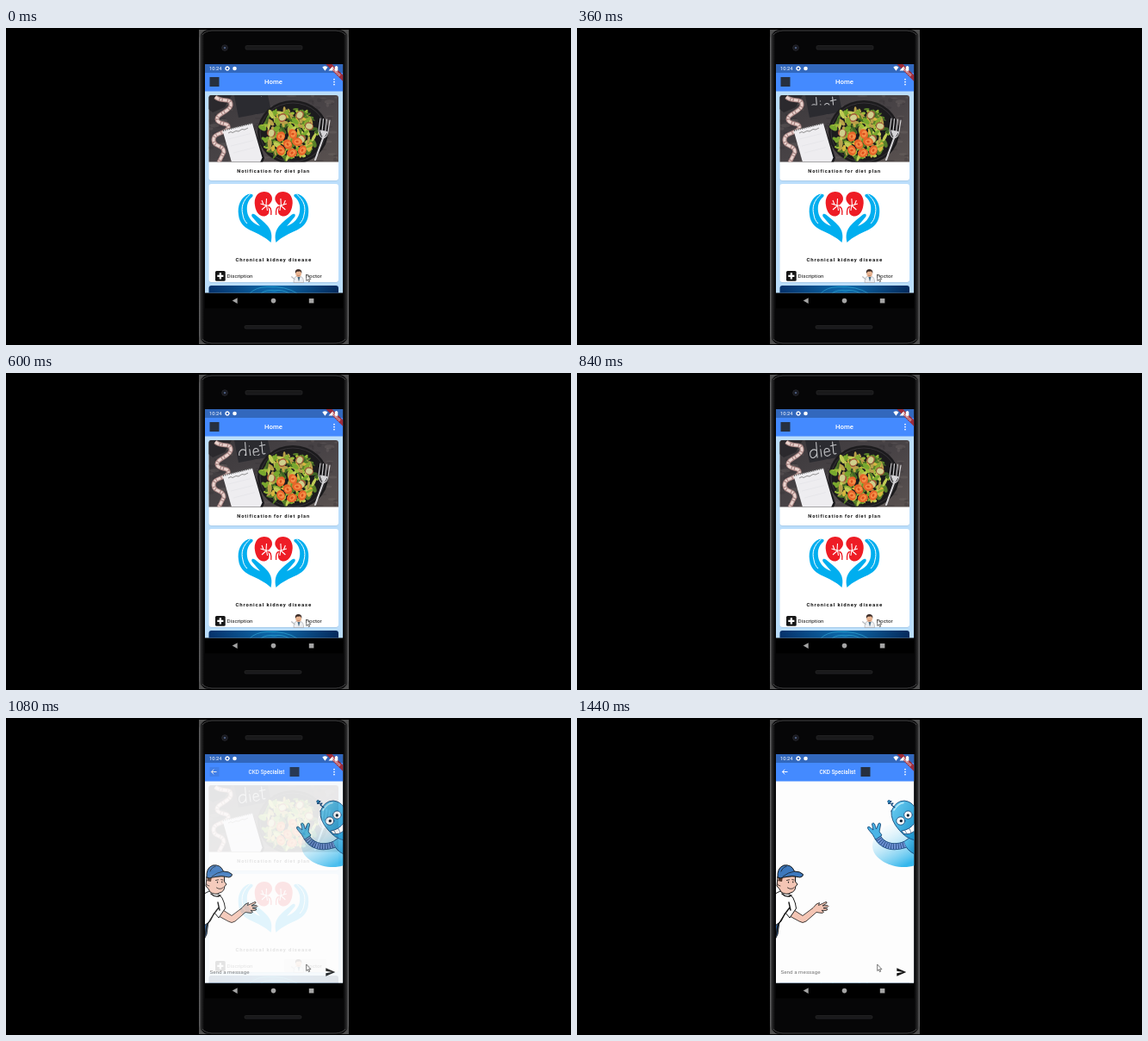
Animation of 656x368 px, one loop 1800 ms. Source, as an HTML page:

```html
<!DOCTYPE html>
<html lang="en">
<head>
<meta charset="utf-8">
<title>Health app</title>
<style>
html, body { margin: 0; width: 100%; height: 100%; overflow: hidden; background: #000; }
svg { display: block; width: 656px; height: 368px; }
text { font-family: Roboto, sans-serif; }
</style>
</head>
<body>
<svg viewBox="0 0 656 368">
  <defs>
    <clipPath id="screen"><rect x="231" y="42" width="160.3" height="265.5"/></clipPath>
    <clipPath id="photo"><path d="M235.5 155.5V81q0-3 3-3H383q3 0 3 3v74.5z"/></clipPath>
    <clipPath id="reveal"><rect id="wipe" x="260" y="70" width="60" height="10"/></clipPath>
    <linearGradient id="edge">
      <stop offset="0" stop-color="#6b6b6c"/><stop offset=".014" stop-color="#2a2a2b"/>
      <stop offset=".035" stop-color="#060607"/><stop offset=".965" stop-color="#060607"/>
      <stop offset=".986" stop-color="#2a2a2b"/><stop offset="1" stop-color="#6b6b6c"/>
    </linearGradient>
    <linearGradient id="slate" x2="1" y2="1">
      <stop offset="0" stop-color="#3b383b"/><stop offset=".5" stop-color="#484346"/>
      <stop offset="1" stop-color="#5a5250"/>
    </linearGradient>
    <linearGradient id="glow" x1=".2" x2=".7" y2="1">
      <stop offset="0" stop-color="#ffffff" stop-opacity=".2"/><stop offset="1" stop-color="#35b7ec"/>
    </linearGradient>
    <linearGradient id="brain">
      <stop offset="0" stop-color="#06326b"/><stop offset=".5" stop-color="#0d6bac"/>
      <stop offset="1" stop-color="#052a5c"/>
    </linearGradient>
    <linearGradient id="metal" x2="1" y2="1">
      <stop offset="0" stop-color="#6fd0f4"/><stop offset="1" stop-color="#178fc9"/>
    </linearGradient>
    <g id="bar">
      <rect x="231" y="42" width="160.3" height="10" fill="#3268bd"/>
      <rect x="231" y="52" width="160.3" height="21.5" fill="#448aff"/>
      <g fill="#fff"><circle cx="381" cy="59.6" r=".9"/><circle cx="381" cy="62.6" r=".9"/><circle cx="381" cy="65.6" r=".9"/></g>
    </g>
    <g id="hand">
      <path fill="#00aeef" d="M281 193C272 197 268.500 207 270 217C271 226 276 231 283 234.500C292 238.500 300 242 307.500 249C309.500 241 308 235 304 230C300 225 294 221 289 216.500C286 214.500 284 217 286 219.500L295 230C287 227 281 221 280 213C279 206 281 200 286 196C288 193 285 192 281 193Z"/>
      <path fill="none" stroke="#fff" stroke-width="1" d="M283.500 193C275 200 272.500 208 275 217C275.500 221 277 224 280 227"/>
    </g>
    <g id="kidney">
      <path fill="#ee1c25" d="M299.500 190C291 190 287.500 198.500 289 206C290 213.500 294 218.500 299 218.500C303 218.500 305.500 216 305.500 212.500C305.500 210 304 208.500 304.500 206.500C305 204.500 308 203 308.800 200C310 195 306.500 190 299.500 190Z"/>
      <path fill="none" stroke="#fff" stroke-width="1.100" d="M309 206L302 206L295.500 204M302 206L302.500 198M302.500 206L297 211M302.500 206L303.500 212M299 205L297 200"/>
      <path fill="none" stroke="#ee1c25" stroke-width="1.300" d="M304.500 207.500Q308.500 208 307.800 217"/>
    </g>
  </defs>

  <rect width="656" height="368" fill="#000"/>
  <rect x="224" y="2" width="174" height="365" fill="#4f4f4f"/>
  <rect x="224" y="2" width="174" height="365" rx="12" fill="url(#edge)"/>
  <path d="M228 8Q231 3.500 239 3H383Q391 3.500 394 8M228 361Q231 365.500 239 366H383Q391 365.500 394 361" fill="none" stroke="#4a4a4b" stroke-width=".9"/>
  <g fill="#19191a" stroke="#2a2a2b" stroke-width=".7">
    <rect x="278" y="20.500" width="66" height="4.500" rx="1.500"/>
    <rect x="277" y="345.500" width="66" height="3.500" rx="1.500"/>
  </g>
  <circle cx="254" cy="23" r="3.300" fill="#15161c" stroke="#2c2d34" stroke-width=".8"/>
  <circle cx="254" cy="23" r="1.300" fill="#4a5879"/>
  <rect x="231" y="307" width="160.300" height="18.500" fill="#000"/>
  <g fill="#a4a4a4">
    <path d="M262.700 316.600L268.700 313.200V320z"/><circle cx="310.500" cy="316.600" r="2.800"/><rect x="351.800" y="314" width="5.600" height="5.400"/>
  </g>

  <g clip-path="url(#screen)">
    <g id="home">
      <rect x="231" y="42" width="160.300" height="266" fill="#bbdefb"/>
      <use href="#bar"/>
      <rect x="236.500" y="57" width="11" height="11" fill="#26303f"/>
      <text x="310.500" y="65.300" font-size="7.800" font-weight="500" fill="#fff" text-anchor="middle">Home</text>
      <g fill="#a6c9e6"><rect x="235.500" y="78.700" width="150.500" height="99" rx="3"/><rect x="235.500" y="181.700" width="150.500" height="114" rx="3"/></g>
      <g fill="#fff"><rect x="235.500" y="78" width="150.500" height="99" rx="3"/><rect x="235.500" y="181" width="150.500" height="114" rx="3"/></g>

      <g clip-path="url(#photo)">
        <rect x="235" y="78" width="152" height="78" fill="url(#slate)"/>
        <g id="grain"></g>
        <path d="M235 78H262L254 92L240 98L235 94z" fill="#2b292d"/>
        <path d="M265 78H304L308 97L270 104z" fill="#2b2b30"/>
        <g clip-path="url(#reveal)">
          <path transform="translate(13.500 3.500) scale(.95)" fill="none" stroke="#c2c3c6" stroke-width="1.150" stroke-linecap="round" d="M278 81L279.500 99.500M278.500 91C274 88 269.500 92 271 97.500C272.500 102 278 100 279 94M283.500 89.500L284.700 98.500M283 85.500V85.800M288 93.500L294.500 92C294 86.500 287.500 87.500 288 93.500C288.500 99 293 98.500 295.500 95.500M298 80.500L299.300 93.500Q300 96.500 302.500 94.500M295.500 85.500L302.500 84"/>
        </g>
        <g fill="none">
          <path d="M243 80C251 87 262 80 261 90C259 98 245 99 245 106C246 113 260 109 258 116C255 123 241 121 241 130C241 139 253 135 253 144L247 156" stroke="#a98583" stroke-width="5"/>
          <path d="M243 80C251 87 262 80 261 90C259 98 245 99 245 106C246 113 260 109 258 116C255 123 241 121 241 130C241 139 253 135 253 144L247 156" stroke="#e9d3ce" stroke-width="3" stroke-dasharray="5 1.200 2 1.200"/>
        </g>
        <path d="M254 122L287 112.500L300 151L298 156H262z" fill="#18181b"/>
        <path d="M251.500 119L286 110.500L297.500 150.500L295 156H262z" fill="#eeedf0"/>
        <path d="M252 119L286 110.500" stroke="#555" stroke-width="2" stroke-dasharray="1 1.300"/>
        <path d="M258 129L284 122.500M261 137L287 130.500M264 145L289 138.500" stroke="#dedee3" stroke-width=".5"/>
        <path d="M258 122l3 -1.500 2 1 4 -2 3 .5 4 -2.500 3 .5 4 -2" fill="none" stroke="#777" stroke-width=".8"/>
        <ellipse cx="333" cy="121" rx="41" ry="37" fill="#1c1b1d"/>
        <ellipse cx="333" cy="121" rx="38" ry="34" fill="none" stroke="#363337"/>
        <g id="salad"></g>
        <g fill="none" stroke="#d6d5d8" stroke-linecap="round">
          <path d="M368 128L359 153" stroke-width="2.100"/>
          <path d="M365 105L363 119Q364 127 368 128Q373 127 374 120L376 107M368.500 105.500L367 120M372.300 106L370.700 121" stroke-width="1.100"/>
          <path d="M365 119L373 120.500L368.500 128z" fill="#d6d5d8" stroke-width="1"/>
        </g>
      </g>
      <text x="268.300" y="168.200" font-size="5.600" font-weight="700" letter-spacing=".9" fill="#111">Notification for diet plan</text>

      <use href="#hand"/><use href="#hand" transform="matrix(-1 0 0 1 621 0)"/>
      <use href="#kidney"/><use href="#kidney" transform="matrix(-1 0 0 1 621.400 0)"/>
      <text x="266.400" y="271" font-size="6" font-weight="700" letter-spacing=".9" fill="#111">Chronical kidney disease</text>
      <rect id="press" x="323" y="280" width="49" height="15" rx="1.500" fill="#dadada"/>
      <rect x="243" y="282" width="11.700" height="11.700" rx="1.500" fill="#161616"/>
      <path d="M248.850 284.300V291.400M245.300 287.850H252.400" stroke="#fff" stroke-width="2.300"/>
      <g font-size="6.250" fill="#111"><text x="256.600" y="290">Discription</text><text x="348" y="290">Doctor</text></g>
      <path d="M334 295.500Q334 289 337 288.500H342Q345.500 289 345.500 295.500z" fill="#eef0f3" stroke="#8c8f94" stroke-width=".5"/>
      <path d="M335.500 292L331.300 288.500" stroke="#b9bcc0" stroke-width="1.400"/>
      <path d="M338.500 289L340 294.500L341.500 289z" fill="#4b6c83"/>
      <ellipse cx="339.600" cy="285" rx="3.400" ry="4" fill="#e9b592"/>
      <path d="M336 285Q335 280.500 339 280Q344 280 343.300 285L342 282.500L337.500 282.700z" fill="#3a2a25"/>
      <path d="M338 287Q339.600 288.200 341.200 287" fill="none" stroke="#8e4a3d" stroke-width=".5"/>
      <path d="M235.500 308V302q0-3 3-3H383q3 0 3 3v6z" fill="url(#brain)"/>
      <path d="M283 308Q290 301 303 300.500Q325 299.500 338 308M296 308Q302 303.500 312 305Q320 303 329 308" fill="none" stroke="#36b3dc" stroke-width=".9" opacity=".65"/>
    </g>

    <g id="chat">
      <rect x="231" y="42" width="160.300" height="266" fill="#fdfdfd"/>
      <use href="#bar"/>
      <path d="M244.500 62.500H238.600M241.200 59.700L238.400 62.500L241.200 65.300" fill="none" stroke="#fff" stroke-width="1"/>
      <text x="281.500" y="65" font-size="6.400" font-weight="500" fill="#fff">CKD Specialist</text>
      <rect x="329.500" y="57" width="11" height="11" fill="#26303f"/>

      <path d="M343 148C344 134 357 123 370 122L392 126V171C382 175 366 173 356 167C348 162 343 156 343 148Z" fill="url(#glow)"/>
      <g stroke="#174a7c" stroke-width=".9" stroke-linejoin="round" stroke-linecap="round">
        <path d="M379 144L392 135V158Q383 154 379 144Z" fill="url(#metal)"/>
        <path d="M349 138C354 148 366 152 381 147" fill="none" stroke-width="8" stroke-linecap="butt"/>
        <path d="M349 138C354 148 366 152 381 147" fill="none" stroke="#6d92d3" stroke-width="6.400" stroke-linecap="butt"/>
        <path d="M349 138C354 148 366 152 381 147" fill="none" stroke="#24487f" stroke-width="6.400" stroke-dasharray=".8 2" stroke-linecap="butt"/>
        <path d="M343 135L338 129Q336.500 126 339 126L344 130L342.500 123Q343.500 120.500 345.500 123L347.500 129L350 122.500Q352.500 121 352.500 124L351 132L354 136L347 141Z" fill="#4bb4e6"/>
        <path d="M365 108Q370 96 380 96Q389 97 393 105V142Q382 140 374 130Q364 119 365 108Z" fill="url(#metal)"/>
        <path d="M368 107Q373 99 379 98.500" fill="none" stroke="#b9ebfb" stroke-width="1.500"/>
        <path d="M369 104L365 101L367 99L361.500 99.500L365 96.500" fill="none" stroke-width="1.100"/>
        <circle cx="362.300" cy="97" r="1.500" fill="#2b9bd5"/>
        <ellipse cx="375.800" cy="119.500" rx="5" ry="4.700" fill="#fff"/>
        <ellipse cx="384.500" cy="112.500" rx="4.800" ry="4.600" fill="#fff"/>
        <path d="M377 131Q386 130 392 122V131Q386 136 380 134.500Z" fill="#fff"/>
        <path d="M381 131L383 134.500M386 128.500L388 133" fill="none" stroke-width=".6"/>
      </g>
      <g fill="#14283c"><circle cx="376.300" cy="119.500" r="1.700"/><circle cx="384.300" cy="113" r="1.700"/></g>

      <g stroke="#151515" stroke-width="1" stroke-linejoin="round" stroke-linecap="round">
        <path d="M252 223L262 229.500L274 220.500L278 216L281.500 214.500L280.500 217.500L289 213.500Q291 213.500 289.500 215.300L285 218L291 217.500Q293 218.500 291 219.600L286 220.700L290.500 221.500Q291.500 223 289 223.500L284 223.300L286.500 225Q286 227 283 226.300L278 225.500L266 236Q262 239 258 236L247 230Z" fill="#f4c5b4" stroke-width=".8"/>
        <path d="M230 238L235 236L233 251L230 257Z" fill="#3268a8"/>
        <path d="M230 204L236 201Q247 203 251 209Q254 215 254.500 221L247 232L242 226L237 236L230 241Z" fill="#fff"/>
        <path d="M247 220L241 228L233 241L231 252M246 214Q247 219 248 223M238 204Q243 209 249 206" fill="none" stroke-width="1.400"/>
        <path d="M233 185L232 195Q236 199 237 202Q243 206 248 203Q254 201 253.500 196L256 193L253.500 190V184Z" fill="#f4c5b4"/>
        <path d="M236 189Q232 187 232.500 192Q233 195 236 195" fill="#f4c5b4" stroke-width=".7"/>
        <path d="M234 184L239 184L238 190L234 189Z" fill="#5a3b2c" stroke="none"/>
        <path d="M233 185Q232 174 240 171Q249 169.500 252.500 178Q259 178 262.500 181.500Q263 184 259 185Q250 182 240 185Q236 187 233 185Z" fill="#3d78bd"/>
        <path d="M239 184Q245 179 252.500 178M237 178Q239 173 243 172.500" fill="none" stroke-width=".7"/>
        <path d="M243.500 188.500L246.500 187.800M249.800 187.600L252 188M244.500 197Q249 200 252 196.800" fill="none" stroke-width=".8"/>
        <path d="M245.500 190.300V191M250.800 190V190.700" stroke-width="1.200"/>
      </g>
      <text x="236.600" y="297.200" font-size="6.250" fill="#777">Send a message</text>
      <path d="M371.300 290.300L382.300 295L371.300 299.700V296.200L378.500 295L371.300 293.800Z" fill="#151515"/>
    </g>

    <path d="M371.500 42H378.500L391.300 54.800V62Z" fill="#9d2b3b"/>
    <text transform="translate(383 51.200) rotate(45)" text-anchor="middle" font-size="4" font-weight="700" fill="#f3dfe2" y=".9">DEBUG</text>
    <g fill="#fff">
      <text x="236" y="49.200" font-size="5.800">10:24</text>
      <circle cx="257" cy="47" r="1.900" fill="none" stroke="#fff" stroke-width="1.200"/>
      <circle cx="257" cy="47" r="2.500" fill="none" stroke="#fff" stroke-width=".8" stroke-dasharray="1 .96"/>
      <circle cx="265.500" cy="47" r="2.300"/>
      <path d="M367.300 45.500Q370.400 43 373.500 45.500L370.400 49.700ZM379.500 44.300V49.500H374.500ZM381.800 44.700h1v-.7h1.500v.7h1v5h-3.500z"/>
    </g>
  </g>
  <path d="M348.700 286V293.500L350.400 292L351.500 294.700L352.700 294.100L351.600 291.600H353.900Z" fill="#fff" stroke="#222" stroke-width=".6"/>
</svg>
<script>
const NS = 'http://www.w3.org/2000/svg';
const $ = id => document.getElementById(id);
let seed = 11;
const rnd = () => (seed = (seed * 16807) % 2147483647) / 2147483647;

function add(parent, tag, attrs) {
  const el = document.createElementNS(NS, tag);
  for (const key in attrs) el.setAttribute(key, attrs[key]);
  parent.append(el);
}

function leaf(cx, cy, rx, ry, fill) {
  const angle = rnd() * 180;
  add($('salad'), 'ellipse', { rx, ry, fill, transform: `translate(${cx} ${cy}) rotate(${angle})` });
}

for (let i = 0; i < 160; i++) {
  add($('grain'), 'ellipse', {
    cx: 235 + rnd() * 152, cy: 78 + rnd() * 78, rx: 1 + rnd() * 5, ry: .5 + rnd() * 2,
    fill: rnd() < .5 ? '#2b282a' : '#857a77', opacity: .22
  });
}

const greens = ['#78a82e', '#9cbc38', '#587f28', '#c0cc55', '#3f6424', '#d8b640', '#88aa32', '#b9a04a'];
for (let i = 0; i < 210; i++) {
  const a = rnd() * 2 * Math.PI, r = Math.sqrt(rnd());
  leaf(329 + Math.cos(a) * r * 32, 122 + Math.sin(a) * r * 30,
    2.5 + rnd() * 4, 1 + rnd() * 1.7, greens[Math.floor(rnd() * greens.length)]);
}
// tomato slices, then carrot curls
for (const [x, y] of [[321, 104], [341, 101], [352, 114], [343, 129], [308, 122]]) {
  leaf(x, y, 5.2, 4.5, '#a4583a');
  leaf(x, y, 4, 3.3, '#cfcf8c');
}
for (const [x, y] of [[319, 126], [333, 123], [327, 135], [338, 132], [344, 142], [332, 145], [319, 142]]) {
  leaf(x, y, 6, 4.8, '#e8662a');
  leaf(x + .5, y, 3.8, 2.8, '#f58f48');
  leaf(x, y, 1.8, 1.3, '#d9501d');
}

const LOOP = 1800, STEP = 120, OPEN = 8;
const fade = [.2, .89, .97, .99, 1];

function draw(t) {
  const k = Math.min(12, Math.floor((t % LOOP) / STEP));
  $('wipe').setAttribute('height', 10 + 3.2 * k);
  $('press').setAttribute('opacity', k < OPEN ? 0 : .65);
  $('chat').setAttribute('opacity', k < OPEN ? 0 : fade[k - OPEN]);
  $('chat').setAttribute('transform', `translate(0 ${k === OPEN ? 25 : 0})`);
}

const start = performance.now();
function tick() {
  draw(performance.now() - start);
  requestAnimationFrame(tick);
}
tick();
</script>
</body>
</html>
```
